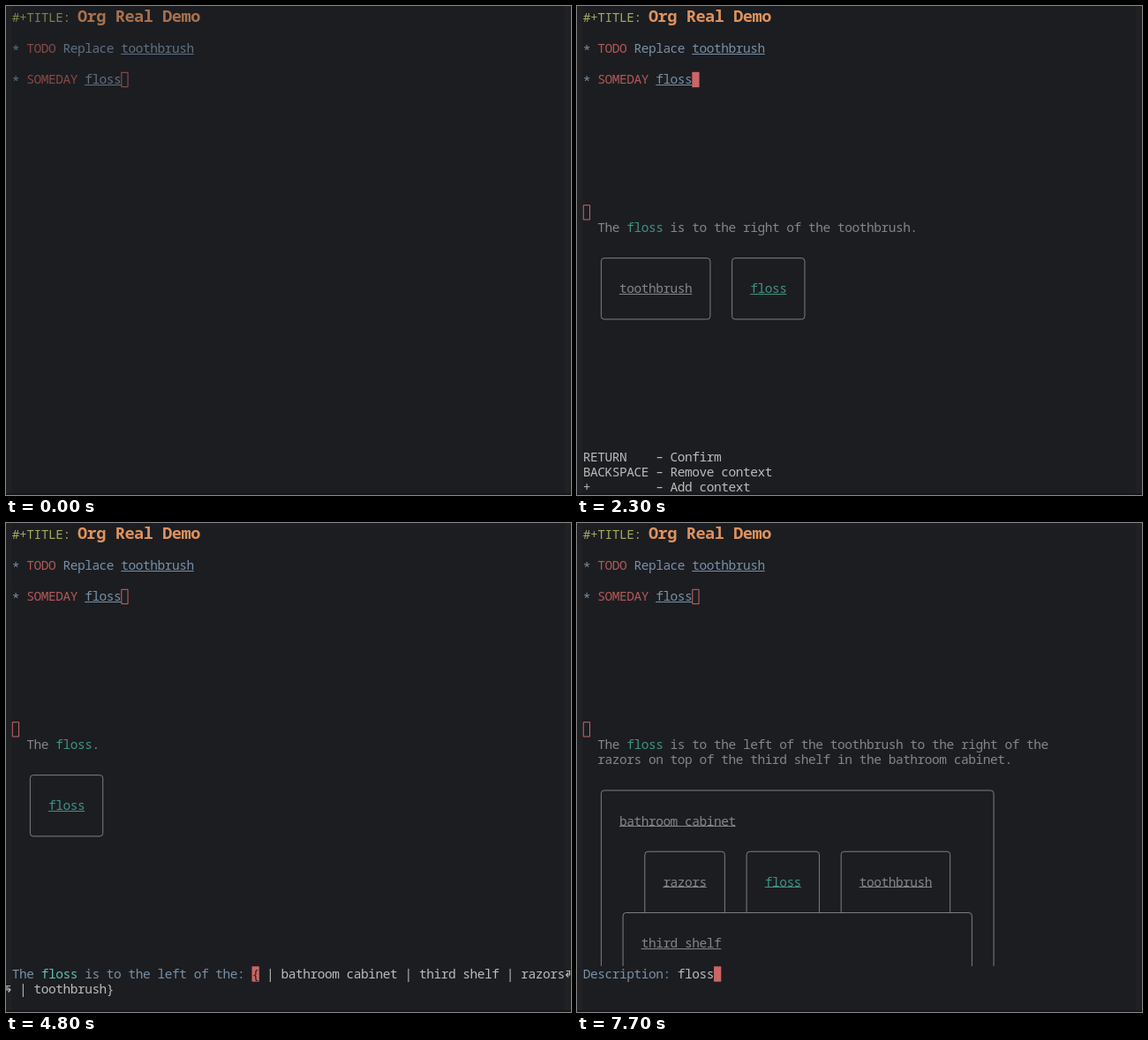
An HTML page that plays this animation: 640 px wide and 554 px high, repeating every 8000 ms.

```html
<!DOCTYPE html>
<html lang="en">
<head>
<meta charset="utf-8">
<title>Org Real Demo</title>
<style>
  html, body { margin: 0; width: 100%; height: 100%; overflow: hidden; background: #1c1d21; }
  svg { display: block; width: 640px; height: 554px; }
  text { font: 300 14.5px "Noto Sans Mono", "DejaVu Sans Mono", monospace; letter-spacing: -0.465px; white-space: pre; }
  text.title { font-size: 18.6px; font-weight: 600; letter-spacing: -0.46px; }
</style>
</head>
<body>
<svg id="stage" viewBox="0 0 640 554"></svg>
<script>
const LOOP = 8000, CELL = 8.235, LEFT = 6.8, LINE = 17.32, COLUMNS = 76;
const C = {
  bg: '#1c1d21', fringe: '#202125', white: '#b9bcba', gray: '#838688', line: '#7c7f80',
  blue: '#7890a6', red: '#b25957', cursor: '#cc6666', orange: '#de935f',
  olive: '#a3aa5e', teal: '#3d9484', bright: '#5fc0b0'
};

const colX = col => LEFT + col * CELL;
const rowY = row => 256 + row * LINE;          // baseline; row 0 opens the popup text
const midX = col => colX(col + 0.5);
const midY = row => rowY(row) - 5;
const PROMPT_ROW = 15, CLIP_Y = 502;

const rect = (x, y, w, h, fill) => `<rect x="${x}" y="${y}" width="${w}" height="${h}" fill="${fill}"/>`;
const put = (col, y, str, color, cls = '') =>
  `<text x="${colX(col)}" y="${y}" fill="${color}" class="${cls}">${str}</text>`;
const link = (col, y, str, color) =>
  put(col, y, str, color) + rect(colX(col), Math.ceil(y), str.length * CELL, 1, color);
const stroke = (d, color, width = 1) =>
  `<path d="${d}" fill="none" stroke="${color}" stroke-width="${width}"/>`;

function cursor(col, y, filled) {
  const x = colX(col), top = y - 13.5;
  return filled ? rect(x, top, CELL, LINE, C.cursor)
    : stroke(`M${x + .5} ${top + .5}h${CELL - 1}v${LINE - 1}h${1 - CELL}z`, C.cursor);
}

function buffer(dim, cursorFilled) {
  const todo = 53.4, someday = 88.3;
  const star = y => put(0, y + 2, '*', C.blue);
  return `<g opacity="${dim ? 0.72 : 1}">` +
    put(0, 18.2, '#+TITLE:', C.olive) + put(9, 18.2, 'Org Real Demo', C.orange, 'title') +
    star(todo) + put(2, todo, 'TODO', C.red) +
    put(7, todo, 'Replace', C.blue) + link(15, todo, 'toothbrush', C.blue) +
    star(someday) + put(2, someday, 'SOMEDAY', C.red) +
    link(10, someday, 'floss', C.blue) + cursor(15, someday, cursorFilled) + '</g>';
}

// Rounded box; without a bottom row it stays open and runs down to endY.
function box(left, right, top, bottom, endY) {
  const x1 = midX(left), x2 = midX(right), y1 = midY(top), r = 3.5;
  const y2 = bottom ? midY(bottom) : endY;
  const open = `M${x1} ${y2}V${y1 + r}q0 ${-r} ${r} ${-r}H${x2 - r}q${r} 0 ${r} ${r}V${y2}`;
  const closed = `M${x1 + r} ${y2}q${-r} 0 ${-r} ${-r}V${y1 + r}q0 ${-r} ${r} ${-r}H${x2 - r}` +
    `q${r} 0 ${r} ${r}V${y2 - r}q0 ${r} ${-r} ${r}z`;
  return stroke(bottom ? closed : open, C.line);
}

// depth 0: loose items, 1: items on the shelf, 2: shelf inside the cabinet
function popup(lines, items, depth) {
  const top = lines.length + 1, itemTop = top + (depth === 2 ? 4 : 0), shelfTop = itemTop + 4;
  let out = cursor(0, rowY(-1), false) +
    put(2, rowY(0), 'The', C.gray) + put(6, rowY(0), 'floss', C.teal) +
    put(11, rowY(0), lines[0], C.gray) +
    (lines[1] ? put(2, rowY(1), lines[1], C.gray) : '');
  const first = 2 + 3 * depth;
  let col = first;
  for (const name of items) {
    const right = col + name.length + 5;
    out += box(col, right, itemTop, depth ? 0 : shelfTop, midY(shelfTop)) +
      link(col + 3, rowY(itemTop + 2), name, name === 'floss' ? C.teal : C.gray);
    col = right + 3;
  }
  if (depth) {
    out += box(first - 3, col, shelfTop, depth === 1 ? shelfTop + 4 : 0, CLIP_Y) +
      link(first, rowY(shelfTop + 2), 'third shelf', C.gray);
  }
  if (depth === 2) {
    out += box(2, col + 3, top, 0, CLIP_Y) + link(5, rowY(top + 2), 'bathroom cabinet', C.gray);
  }
  return out;
}

const help = () => ['RETURN    – Confirm', 'BACKSPACE – Remove context', '+         – Add context']
  .map((str, i) => put(0, rowY(PROMPT_ROW + i), str, C.white)).join('');

// Minibuffer text made of [string, colour] parts, wrapped at the window edge.
function minibuffer(parts, cursorAt) {
  const y = rowY(PROMPT_ROW);
  let out = '', at = 0, under = '';
  for (const [str, color] of parts) {
    if (cursorAt >= at && cursorAt < at + str.length) under = str[cursorAt - at];
    const room = Math.max(0, COLUMNS - at);
    const head = str.slice(0, room), tail = str.slice(room);
    if (head) out += put(at, y, head, color);
    if (tail) out += put(Math.max(0, at - COLUMNS), y + LINE, tail, color);
    at += str.length;
  }
  if (at > COLUMNS) {
    out += stroke('M634.5 507.5h4v4.5h-3M637 509.5l-2.5 2.5l2.5 2.5', C.white, 1.2) +
      stroke('M5 524.5h-4v4.5h3M2.5 526.5l2.5 2.5l-2.5 2.5', C.white, 1.2);
  }
  return out + cursor(cursorAt, y, true) + put(cursorAt, y, under, C.bg);
}

function ask(relation, typed, choices, cursorAtStart) {
  const label = ` is${relation}: `;
  const match = choices.length === 1
    ? [['[', C.white], [choices[0], C.olive], [']', C.white]]
    : [[`{${choices.join(' | ')}}`, C.white]];
  const parts = [['The ', C.blue], ['floss', C.bright], [label, C.blue], [typed, C.white], ...match];
  return buffer(false, false) + popup(['.'], ['floss'], 0) +
    minibuffer(parts, cursorAtStart ? 0 : 9 + label.length + typed.length);
}

const browse = (lines, items, depth) => buffer(false, true) + popup(lines, items, depth) + help();

const LEFT_OF = 'to the left of', RIGHT_OF = 'to the right of';
const relations = ['', 'in', 'on', 'behind', 'in front of', 'above', 'below', LEFT_OF, RIGHT_OF, 'on top of'];
const places = ['', 'bathroom cabinet', 'third shelf', 'razors', 'toothbrush'];
const askRelation = (typed, choices, done) => ask('', typed, choices, done);
const askPlace = (typed, choices, done) => ask(` ${LEFT_OF} the`, typed, choices, done);

const chain = side => ` is to the ${side} of the toothbrush to the right of the`;
const onShelf = 'razors on top of the third shelf';
const inCabinet = onShelf + ' in the bathroom cabinet.';
const before = ['razors', 'toothbrush', 'floss'], after = ['razors', 'floss', 'toothbrush'];

const timeline = [
  [0, () => buffer(true, false)],
  [400, () => buffer(false, true)],
  [1200, () => browse([chain('right'), inCabinet], before, 2)],
  [1900, () => browse([chain('right'), onShelf + '.'], before, 1)],
  [2100, () => browse([chain('right'), 'razors.'], before, 0)],
  [2300, () => browse([' is to the right of the toothbrush.'], ['toothbrush', 'floss'], 0)],
  [2500, () => browse(['.'], ['floss'], 0)],
  [3300, () => askRelation('', relations)],
  [3900, () => askRelation('t', [LEFT_OF, RIGHT_OF])],
  [4000, () => askRelation('to', [LEFT_OF, RIGHT_OF])],
  [4100, () => askRelation('to the ', [LEFT_OF, RIGHT_OF])],
  [4200, () => askRelation('to the l', [LEFT_OF])],
  [4600, () => askRelation('to the l', [LEFT_OF], true)],
  [4700, () => askPlace('', places)],
  [5200, () => askPlace('t', ['third shelf', 'toothbrush'])],
  [5300, () => askPlace('to', ['toothbrush'])],
  [5400, () => askPlace('too', ['toothbrush'])],
  [5800, () => askPlace('too', ['toothbrush'], true)],
  [5900, () => browse([chain('left'), inCabinet], after, 2)],
  [7600, () => buffer(false, false) + popup([chain('left'), inCabinet], after, 2) +
    minibuffer([['Description: ', C.blue], ['floss', C.white]], 18)]
];

const backdrop = rect(0, 0, 640, 554, C.bg) + rect(0, 0, 6.5, 552, C.fringe) +
  rect(632.5, 0, 7.5, 552, C.fringe) + rect(0, 552, 640, 2, '#161719');
const stage = document.getElementById('stage');
let shown;

function tick() {
  const t = performance.now() % LOOP;
  const step = timeline.findLast(([start]) => start <= t);
  if (step !== shown) {
    stage.innerHTML = backdrop + step[1]();
    shown = step;
  }
  requestAnimationFrame(tick);
}
tick();
</script>
</body>
</html>
```
